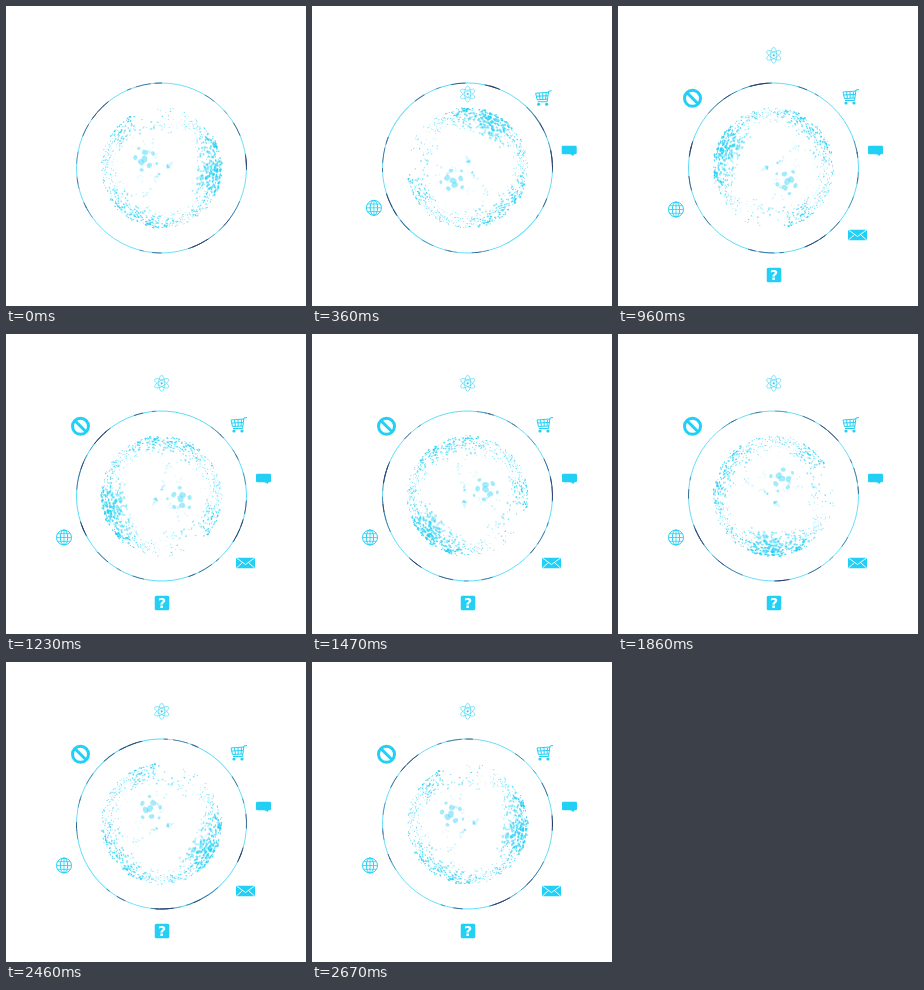
Recreate the animation shown at these times as an HTML page with a canvas. Size 300 by 300 pixels, loop 2.7 s.

```html
<!DOCTYPE html>
<html lang="en">
<head>
<meta charset="utf-8">
<style>
  html, body { margin: 0; width: 100%; height: 100%; overflow: hidden; background: #fff; }
  canvas { display: block; }
</style>
</head>
<body>
<canvas id="stage" width="300" height="300"></canvas>
<script>
const LOOP = 2700, POP = 420, CX = 155.5, CY = 162, RING = 85, GLOBE = 60.5;
const TAU = Math.PI * 2, CYAN = '#23d0f5', NAVY = '#2b2f63';
const ctx = document.getElementById('stage').getContext('2d');

let seed = 7;
const random = () => (seed = seed * 16807 % 2147483647) / 2147483647;
const spread = width => (random() + random() + random() - 1.5) * width;
const list = (count, make) => Array.from({ length: count }, (_, i) => make(i));

// Three thick regions around the rim, the strongest on the right
const thickness = a => (1 + Math.cos(3 * a)) / 2 * (0.75 + 0.25 * Math.cos(a));

// Dots gather in clumps that thin out away from the rim
function makeClump() {
  let angle;
  do angle = random() * TAU; while (random() > 0.3 + 0.7 * thickness(angle));
  const thick = thickness(angle);
  const depth = -Math.log(1 - random()) * (5 + 7 * thick);
  return list(12, () => {
    const a = angle + spread(0.3);
    const inset = Math.min(54, Math.abs(depth + spread(10)));
    const r = GLOBE - inset;
    const size = (0.55 + 0.85 * thick) * (0.5 + random() * 0.75);
    return {
      x: r * Math.cos(a), y: r * Math.sin(a), a, size,
      squash: Math.max(0.6, Math.sqrt(1 - (r / 66) ** 2)),
      alpha: Math.max(0.2, 1 - inset / 38) * (0.7 + random() * 0.3)
    };
  });
}
const dots = list(88, makeClump).flat();

// Large pale spots: a loose flower left of the middle
const spots = list(9, i => {
  const a = i * 2.4, r = 4.6 * Math.sqrt(i);
  return { x: -17 + r * Math.cos(a), y: -9 + r * Math.sin(a), a, size: 3.6 - i * 0.25, squash: 0.8, alpha: 0.42 };
});

const dashes = list(34, () => {
  const from = random() * TAU;
  return { from, to: from + 0.03 + random() * 0.17, alpha: 0.35 + random() * 0.4 };
});

function ellipse(x, y, rx, ry, angle = 0) {
  ctx.beginPath();
  ctx.ellipse(x, y, rx, ry, angle, 0, TAU);
}

function arc(from, to, color, alpha) {
  ctx.globalAlpha = alpha;
  ctx.strokeStyle = color;
  ctx.beginPath();
  ctx.arc(0, 0, RING, from, to);
  ctx.stroke();
}

function drawGlobe(turn) {
  ctx.save();
  ctx.translate(CX, CY);
  ctx.rotate(-turn);
  ctx.fillStyle = CYAN;
  for (const d of [...dots, ...spots]) {
    ctx.globalAlpha = d.alpha;
    ellipse(d.x, d.y, d.size * d.squash, d.size, d.a);
    ctx.fill();
  }
  ctx.lineWidth = 0.9;
  arc(0, TAU, CYAN, 0.75);
  for (const d of dashes) arc(d.from, d.to, NAVY, d.alpha);
  ctx.restore();
}

function path(d, width) {
  ctx.lineWidth = width;
  ctx.stroke(new Path2D(d));
}

function box(w, h, r) {
  ctx.beginPath();
  ctx.roundRect(-w / 2, -h / 2, w, h, r);
  ctx.fill();
}

function chat() {
  box(15, 8.5, 1.3);
  ctx.fill(new Path2D('M1 4H5L4 6Z'));
}

function cart() {
  path('M8 -7.5L5 -7L3.5 3.5H-6M5 -6L-8 -5L-6.5 1.5L4 1M-7.5 -2L4 -2.5', 1);
  for (const x of [-4.5, -1, 2.5]) path(`M${x} -5.2L${x * 0.8} 1`, 1);
  for (const x of [-5, 3]) {
    ellipse(x, 6, 1.6, 1.6);
    ctx.fill();
  }
}

function globe() {
  ctx.lineWidth = 1;
  for (const rx of [7.5, 3.7]) {
    ellipse(0, 0, rx, 7.5);
    ctx.stroke();
  }
  path('M0 -7.5V7.5M-7.5 0H7.5M-6.4 -3.8H6.4M-6.4 3.8H6.4', 0.8);
}

function atom() {
  ctx.lineWidth = 0.55;
  for (let i = 0; i < 3; i++) {
    ellipse(0, 0, 8, 3, TAU / 12 + i * TAU / 6);
    ctx.stroke();
  }
  ellipse(0, 0, 1.1, 1.1);
  ctx.fill();
}

function mail() {
  box(19, 10.5, 1.2);
  ctx.strokeStyle = '#fff';
  path('M-9 -5L0 1.5L9 -5M-9 5L-3 -.5M9 5L3 -.5', 0.9);
}

function ban() {
  ctx.lineWidth = 3;
  ellipse(0, 0, 8, 8);
  ctx.stroke();
  path('M-5.5 -5.5L5.5 5.5', 3);
}

function question() {
  box(14.5, 14.5, 1.5);
  ctx.fillStyle = '#fff';
  ctx.font = 'bold 14px "DejaVu Sans", sans-serif';
  ctx.textAlign = 'center';
  ctx.fillText('?', 0, 5.2);
}

// Icon, resting place, start time in ms
const icons = [
  [chat, 257.5, 144, 0], [cart, 233, 91, 50], [globe, 58, 203.5, 85],
  [atom, 155.7, 49.3, 235], [mail, 239.5, 229, 380], [ban, 74.5, 92.3, 440],
  [question, 156, 269, 500]
];

function drawIcon([draw, x, y, start], t) {
  const p = Math.min(1, (t - start) / POP);
  if (p <= 0) return;
  const k = 1 - (1 - p) ** 3;
  ctx.save();
  ctx.globalAlpha = Math.min(1, p * 3);
  ctx.translate(CX + (x - CX) * k, CY + (y - CY) * k);
  ctx.fillStyle = ctx.strokeStyle = CYAN;
  draw();
  ctx.restore();
}

function frame() {
  const t = performance.now() % LOOP, u = t / LOOP;
  ctx.fillStyle = '#fff';
  ctx.fillRect(0, 0, 300, 300);
  // One full turn, quick at first and slowing down
  drawGlobe(TAU * (u + (0.55 - 0.35 * u) * u * (1 - u)));
  icons.forEach(icon => drawIcon(icon, t));
  requestAnimationFrame(frame);
}
frame();
</script>
</body>
</html>
```
